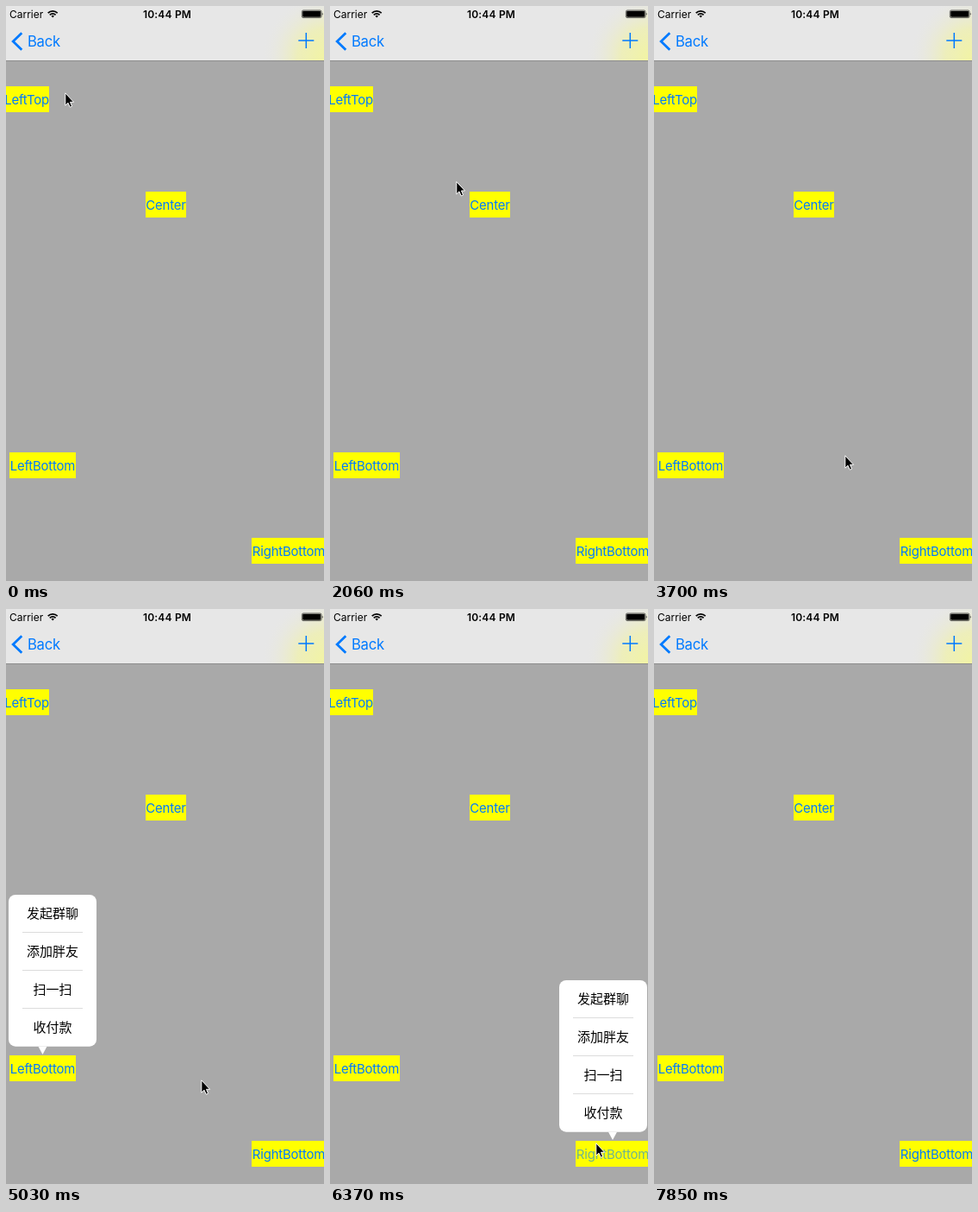
An HTML page for the animation above (8.27 s loop, 369 by 666 pixels).

```html
<!DOCTYPE html>
<html lang="zh-CN">
<head>
<meta charset="utf-8">
<title>Popup menus</title>
<style>
  html, body { margin: 0; width: 100%; height: 100%; overflow: hidden; background: #a9a9a9; }
  svg { display: block; width: 369px; height: 666px; }
  text { font-family: Inter, sans-serif; }
  .label { font-size: 14.9px; letter-spacing: -.012em; text-anchor: middle; fill: #007aff; }
  .item { font-family: "Noto Sans CJK SC", "Noto Sans CJK", sans-serif; font-size: 15px; }
</style>
</head>
<body>
<svg id="stage" viewBox="0 0 369 666">
  <defs>
    <radialGradient id="glow" gradientUnits="userSpaceOnUse" cx="372" cy="60" r="76">
      <stop offset="0" stop-color="#f2f4a2"/>
      <stop offset=".45" stop-color="#eeefb6" stop-opacity=".9"/>
      <stop offset="1" stop-color="#e7e7e7" stop-opacity="0"/>
    </radialGradient>
  </defs>
  <rect width="369" height="666" fill="#a9a9a9"/>
  <rect width="369" height="63" fill="#e7e7e7"/>
  <rect width="369" height="63" fill="url(#glow)"/>
  <rect y="63" width="369" height="1" fill="#8c8c8c"/>

  <text x="4" y="13.5" font-size="12">Carrier</text>
  <g fill="none" stroke="#000" stroke-width="1.7">
    <path d="M48.7 8.2a7.8 7.8 0 0 1 11 0M50.8 10.3a4.8 4.8 0 0 1 6.8 0"/>
    <path d="M54.2 13.4l-1.7-1.8a2.4 2.4 0 0 1 3.4 0z" fill="#000" stroke="none"/>
  </g>
  <text x="187" y="13.5" font-size="12" font-weight="600" letter-spacing=".2" text-anchor="middle">10:44 PM</text>
  <rect x="343.4" y="5" width="22.6" height="8.6" rx="1.6" fill="none" stroke="#000" stroke-width=".6"/>
  <rect x="344.2" y="5.8" width="21" height="7" rx="1"/>
  <path d="M366.8 7.6q1.6 1.7 0 3.4z"/>

  <path d="M18.3 31.2L8.2 41l10.1 9.8" fill="none" stroke="#007aff" stroke-width="2.8"/>
  <text x="25" y="47" font-size="16.7" letter-spacing="-.3" fill="#007aff">Back</text>
  <path d="M339.3 40h18M348.3 31v18" stroke="#007aff" stroke-width="1.5"/>

  <g id="buttons"></g>
  <g id="menus"></g>
  <path id="cursor" d="M.8 .8V15.2L4 12.2L6.2 17.2L8.6 16.2L6.5 11.3H10.6Z"
        stroke="#fff" stroke-width="1" stroke-linejoin="round"/>
</svg>
<script>
const LOOP = 8270, TICK = 148.1, LEAD = 17.5;   // the screen refreshes once per tick
const FADE = 1.6, RECOVER = 3.5;                // in ticks
const ITEMS = ['发起群聊', '添加胖友', '扫一扫', '收付款'];
const $ = id => document.getElementById(id);

// press, release and dismiss are in ticks
const buttons = [
  { name: 'LeftTop', x: -2, y: 93, w: 52, press: 3.6, release: 4.4, dismiss: 11.4,
    menu: { x: 3, y: 133, w: 102, tipX: 24 } },
  { name: 'Center', x: 162, y: 215, w: 47, press: 15.5, release: 16.4, dismiss: 23.4,
    menu: { x: 117.5, y: 255, w: 136, tipX: 185.5, dark: true } },
  { name: 'LeftBottom', x: 4, y: 517, w: 77, press: 29.6, release: 30.4, dismiss: 35.4,
    menu: { x: 3, y: 331, w: 102, tipX: 42.5, below: true } },
  { name: 'RightBottom', x: 285, y: 616, w: 86, press: 40.5, release: 41.4, dismiss: 47.4,
    menu: { x: 266, y: 430, w: 102, tipX: 328, below: true } },
];

// tick, x, y
const cursorPath = [
  [0, 68, 100], [2, 33, 110], [6, 33, 110], [9, 128, 190], [13, 128, 190],
  [15.5, 179, 226], [19, 179, 226], [22, 266, 516], [24, 266, 516], [25, 221, 520],
  [28, 60, 520], [31, 60, 520], [34, 226, 545], [37, 226, 545], [40, 308, 618],
  [43, 308, 618], [46, 345, 536], [49, 345, 536], [53, 350, 670],
];

const heart = (x, y) => `<path transform="translate(${x} ${y})" fill="#d32f62"
  d="M0 9C-3 6-10 2-10-3.5C-10-9-3-10.5 0-5.5C3-10.5 10-9 10-3.5C10 2 3 6 0 9Z"/>`;

function menuMarkup({ x, y, w, tipX, dark, below }) {
  const h = 175.7, base = below ? y + h : y, tip = below ? base + 9.3 : base - 9.3;
  const rows = ITEMS.map((item, i) => {
    const mid = y + 22 + i * 44;
    const line = i ? `<rect x="${x + 16}" y="${mid - 23}" width="${w - 32}" height="1"
      fill="${dark ? '#a6a6a6' : '#dcdcdc'}"/>` : '';
    const place = dark ? `x="${x + 55}" fill="#fff"` : `x="${x + w / 2}" text-anchor="middle"`;
    return `${line}${dark ? heart(x + 31, mid) : ''}<text class="item" ${place} y="${mid + 4.8}">${item}</text>`;
  });
  return `<g opacity="0"><g fill="${dark ? '#808080' : '#fff'}">
    <rect x="${x}" y="${y}" width="${w}" height="${h}" rx="8"/>
    <path d="M${tipX - 5} ${base}L${tipX} ${tip}L${tipX + 5} ${base}Z"/></g>${rows.join('')}</g>`;
}

$('buttons').innerHTML = buttons.map(({ name, x, y, w }) =>
  `<rect x="${x}" y="${y}" width="${w}" height="30" fill="#ff0"/>
   <text class="label" x="${x + w / 2}" y="${y + 20.5}">${name}</text>`).join('');
$('menus').innerHTML = buttons.map(b => menuMarkup(b.menu)).join('');
const labels = document.querySelectorAll('.label'), menus = $('menus').children;

const clamp = v => Math.max(0, Math.min(1, v));
const ease = v => (v = clamp(v), v * v * (3 - 2 * v));

function cursorAt(tick) {
  const next = cursorPath.findIndex(p => p[0] > tick);
  if (next < 0) return cursorPath[cursorPath.length - 1].slice(1);
  const [t0, x0, y0] = cursorPath[next - 1], [t1, x1, y1] = cursorPath[next];
  const k = ease((tick - t0) / (t1 - t0));
  return [x0 + (x1 - x0) * k, y0 + (y1 - y0) * k];
}

function draw(now) {
  const tick = Math.floor((now % LOOP + LEAD) / TICK);
  buttons.forEach(({ press, release, dismiss }, i) => {
    const label = tick < press ? 1 : .2 + .8 * clamp((tick - release) / RECOVER);
    const menu = ease((tick - release) / FADE) * (1 - ease((tick - dismiss) / FADE));
    labels[i].setAttribute('opacity', label);
    menus[i].setAttribute('opacity', menu);
  });
  $('cursor').setAttribute('transform', `translate(${cursorAt(tick)})`);
}

const start = performance.now();
function loop() {
  draw(performance.now() - start);
  requestAnimationFrame(loop);
}
loop();
</script>
</body>
</html>
```
